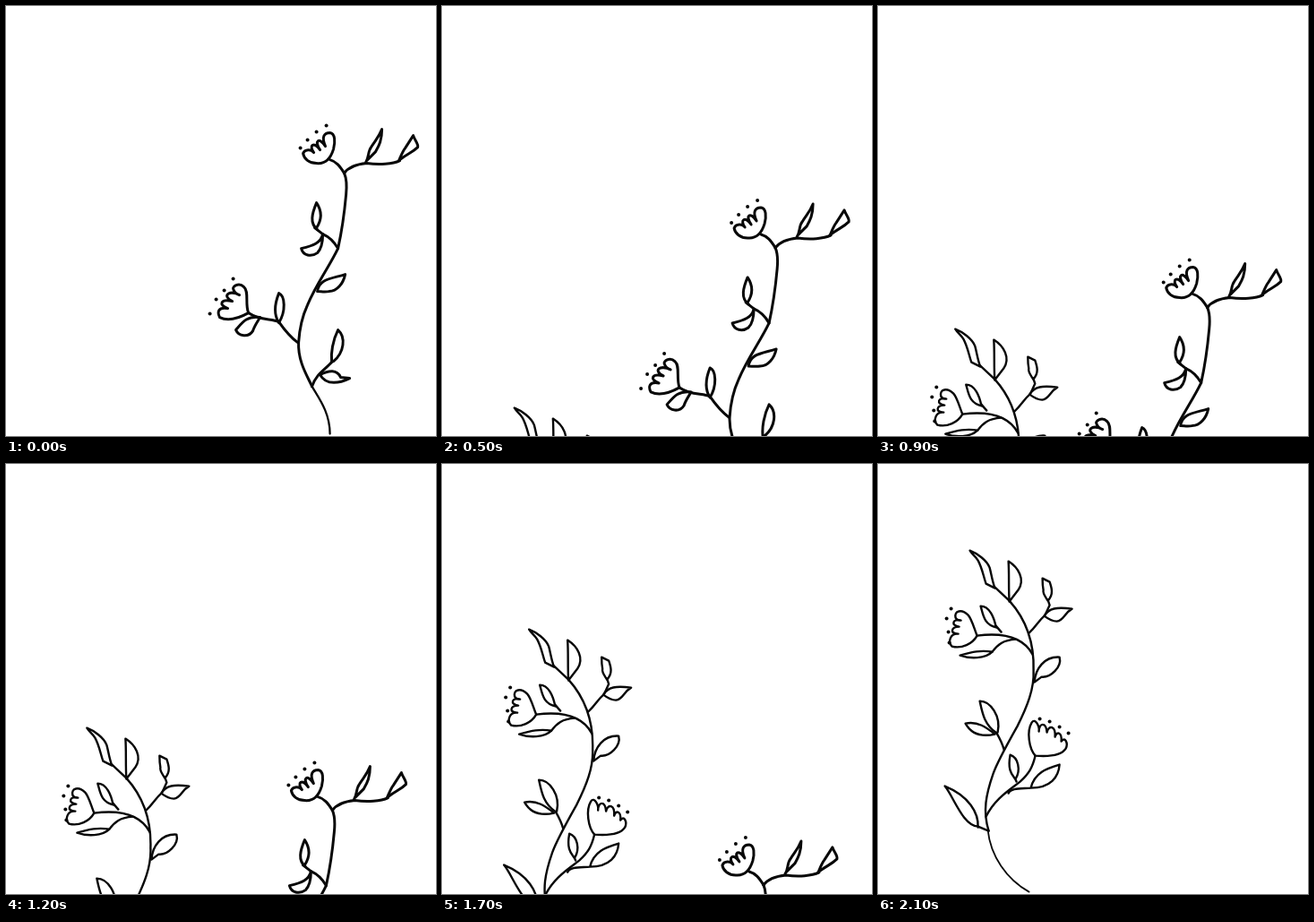
An HTML page with a canvas for the animation above (2.2 s loop, 480 px wide and 480 px high).

```html
<!DOCTYPE html>
<html lang="en">
<head>
<meta charset="utf-8">
<title>Drifting flowers</title>
<style>
html, body { margin: 0; width: 100%; height: 100%; overflow: hidden; background: #fff; }
canvas { display: block; width: 480px; height: 480px; }
</style>
</head>
<body>
<canvas id="stage" width="480" height="480"></canvas>
<script>
const ctx = document.getElementById('stage').getContext('2d');
const STEP = 100, STEPS = 22;

const rightStems = [
  'M341 424C336 413 325 396 326 375C327 360 330 346 336 333C346 309 360 291 370 270C374 252 377 232 379 210C380 200 380 193 377 186',
  'M377 186C382 179 392 176 402 175C416 177 431 176 439 172',
  'M377 186C372 178 368 173 361 171',
  'M370 270C366 263 360 257 353 254L344 247',
  'M325 375C318 370 311 362 304 352C296 348 283 351 270 342',
  'M341 424C345 411 355 406 364 396'
];
const rightTail = 'M341 424C347 435 361 452 361 477';
const rightLeaves = [
  'M438 172C441 165 442 162 445 158L454 144C456 150 460 153 459 157C453 163 448 164 439 171',
  'M401 174C405 168 403 162 407 157C411 150 415 147 419 137C419 149 416 155 412 162L403 171',
  'M347 249C338 242 341 231 346 219C352 228 352 238 346 247',
  'M353 254C351 264 342 267 329 270C331 278 340 280 347 275C352 270 353 262 353 254',
  'M347 318C349 304 362 304 378 299C376 309 369 318 360 318C355 319 351 318 347 318',
  'M304 353C297 342 300 330 304 320C311 323 312 340 304 353',
  'M283 347C268 345 263 353 256 361C259 368 270 370 275 362C277 356 280 352 283 347',
  'M363 396C362 387 364 373 370 361C379 369 377 386 365 396',
  'M350 411C360 406 369 405 373 414L383 415C373 420 357 424 350 411'
];
const rightBlooms = [
  'M331 164C333 159 340 159 343 163C337 155 343 150 350 160C343 150 349 145 356 156C351 145 355 141 361 141C367 142 367 151 365 159C362 169 356 176 346 175C338 175 332 170 331 164',
  'M270 342C266 332 271 318 265 313C259 307 252 313 253 315C254 319 257 321 260 322C248 316 240 323 252 329C239 326 236 333 247 337C236 335 235 341 238 347C248 352 261 347 270 342'
];
const rightDots = [[328,158], [336,149], [346,140], [357,133], [253,304], [243,317], [234,327], [227,343]];

const leftStems = [
  'M123 409C116 387 120 368 128 345C133 331 146 308 155 292C166 270 174 250 173 230C174 199 164 172 146 152L130 137',
  'M168 188C176 181 178 175 186 168L191 157L189 151',
  'M172 212C165 199 149 186 110 191',
  'M153 195C139 196 133 201 127 209',
  'M131 180L137 187',
  'M140 318C138 311 136 307 132 300',
  'M120 393C129 374 145 364 158 354C168 345 172 338 175 325',
  'M111 404L123 409'
];
const leftTail = 'M122 408C125 437 143 463 168 477';
const leftLeaves = [
  'M130 138L120 133C117 125 116 116 111 107C108 102 105 101 102 96C110 99 121 107 124 115C126 122 127 131 130 138',
  'M146 153C145 138 146 122 145 108C156 115 164 128 156 140L146 153',
  'M189 152C186 147 183 144 184 140C183 135 183 131 183 127L191 131C193 137 196 145 189 152',
  'M185 169C190 160 199 159 216 161C207 166 207 174 199 175C194 175 189 172 185 169',
  'M132 182C118 179 117 169 114 158C124 158 129 171 131 181',
  'M127 209C114 207 105 209 91 213C102 217 119 217 127 209',
  'M174 243C175 228 185 214 202 215C205 226 192 238 182 237L174 243',
  'M132 300C118 290 116 278 113 264C125 264 137 281 133 299',
  'M130 301C121 294 111 286 97 289C102 298 112 305 130 301',
  'M154 354C152 347 143 346 147 324C156 327 159 341 153 351',
  'M145 367C148 361 158 362 170 361C174 344 188 339 202 335C201 349 192 361 170 361',
  'M111 405C112 389 101 370 74 359C84 371 94 403 111 404'
];
const leftBlooms = [
  'M110 191C107 184 104 172 100 168C93 161 84 163 86 171C87 173 90 174 92 174C83 171 80 180 90 181C81 181 79 189 89 189C80 188 77 198 82 203C93 206 105 200 110 191',
  'M175 325C168 317 165 298 171 288C175 282 180 293 179 298C179 288 187 287 188 299C190 290 198 292 197 304C199 297 205 299 204 309C208 303 212 311 209 317C204 325 188 326 175 325'
];
const leftDots = [[81,161], [76,172], [78,187], [79,199], [180,284], [191,287], [202,293], [212,300]];

const toPaths = list => list.map(d => new Path2D(d));
const right = {
  lines: toPaths([...rightStems, ...rightLeaves, ...rightBlooms]),
  tail: new Path2D(rightTail), dots: rightDots, width: 3, tailWidth: 2.3
};
const left = {
  lines: toPaths([...leftStems, ...leftLeaves, ...leftBlooms]),
  tail: new Path2D(leftTail), dots: leftDots, width: 2.4, tailWidth: 1.8
};

function drawPlant(plant, dx, dy) {
  ctx.save();
  ctx.translate(dx + 0.6, dy + 0.6);
  ctx.lineWidth = plant.width;
  plant.lines.forEach(p => ctx.stroke(p));
  ctx.lineWidth = plant.tailWidth;
  ctx.stroke(plant.tail);
  for (const [x, y] of plant.dots) {
    ctx.beginPath();
    ctx.arc(x, y, 2, 0, Math.PI * 2);
    ctx.fill();
  }
  ctx.restore();
}

function frame(now) {
  const k = Math.floor(now / STEP) % STEPS;
  const rest = STEPS - 1 - k;
  ctx.fillStyle = '#fff';
  ctx.fillRect(0, 0, 480, 480);
  ctx.fillStyle = ctx.strokeStyle = '#080808';
  ctx.lineCap = ctx.lineJoin = 'round';
  // The right plant sinks while the left one rises.
  drawPlant(right, -1.1 * k, k * 50 / 3);
  drawPlant(left, -1.36 * rest, 22 * rest);
}

const start = performance.now();
function loop() {
  frame(performance.now() - start);
  requestAnimationFrame(loop);
}
loop();
</script>
</body>
</html>
```
